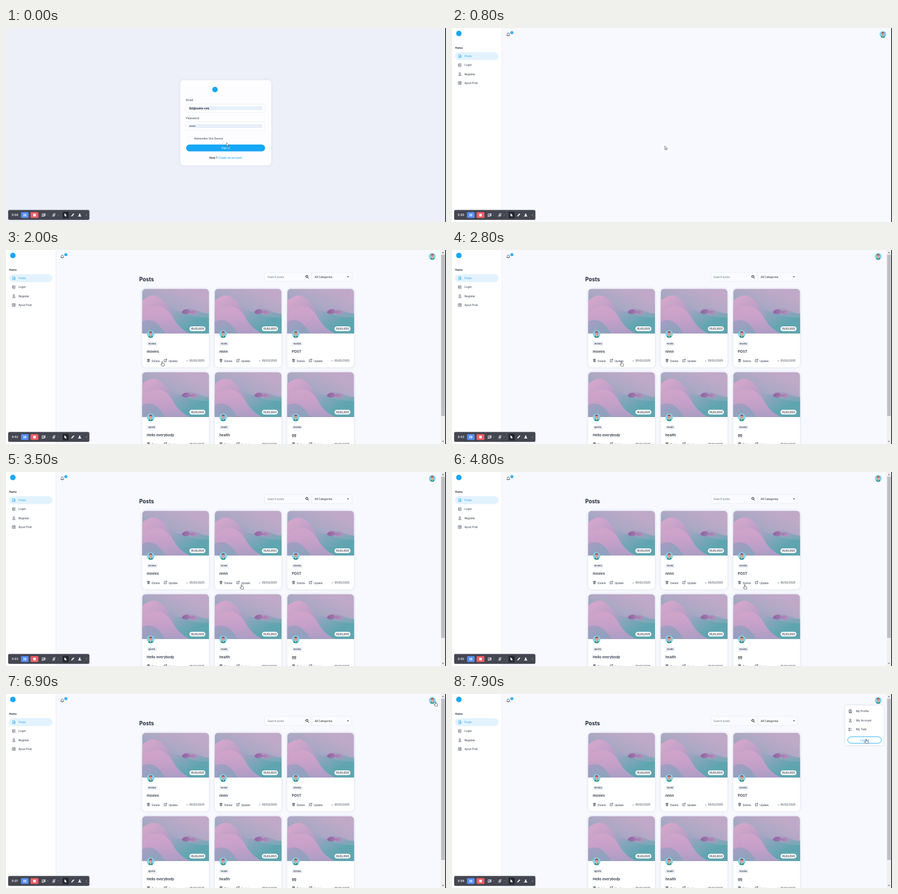
Write an HTML page with a canvas that moves like this. It is 800 by 353 pixels and loops after 8000 ms.

```html
<!DOCTYPE html>
<html lang="en">
<head>
<meta charset="utf-8">
<title>Posts dashboard</title>
<style>
html, body { margin: 0; width: 100%; height: 100%; overflow: hidden; background: #f8f9ff; }
canvas { display: block; width: 800px; height: 353px; }
</style>
</head>
<body>
<canvas id="stage"></canvas>
<script>
const LOOP = 8000, W = 800, H = 353;
const BLUE = '#18a7f4', INK = '#2a3547', DARK = '#1c2536';
const canvas = document.getElementById('stage');
const ctx = canvas.getContext('2d');
const ratio = window.devicePixelRatio || 1;
canvas.width = W * ratio;
canvas.height = H * ratio;

const LOADED = 400, POSTS = 900, MENU_OPEN = 7150;
const SECONDS = [1000, 1900, 2800, 3800, 4700, 5800, 6750, 7700];

// Pointer path: time, x, y
const PATH = [
  [0, 401, 209], [300, 400, 212], [800, 387, 215], [1100, 384, 214],
  [1900, 284, 203], [2300, 285, 203], [2700, 301, 203], [3400, 428, 205],
  [3800, 429, 205], [4600, 530, 205], [4900, 533, 205], [5400, 564, 196],
  [5600, 567, 200], [5800, 568, 200], [6600, 771, 23], [6850, 781, 14],
  [7050, 781, 14], [7500, 757, 64], [7850, 753, 82], [8000, 753, 82]
];

function text(str, x, y, size, color = INK, weight = 400, align = 'left') {
  ctx.font = `${weight} ${size}px Inter, sans-serif`;
  ctx.textAlign = align;
  ctx.fillStyle = color;
  ctx.fillText(str, x, y);
}

function box(x, y, w, h, r, fill, stroke, line = 0.6) {
  ctx.beginPath();
  ctx.roundRect(x, y, w, h, r);
  if (fill) { ctx.fillStyle = fill; ctx.fill(); }
  if (stroke) { ctx.strokeStyle = stroke; ctx.lineWidth = line; ctx.stroke(); }
}

function raised(x, y, w, h, r, blur, fill = '#fff') {
  ctx.save();
  ctx.shadowColor = 'rgba(90,110,150,.22)';
  ctx.shadowBlur = blur * ratio;
  box(x, y, w, h, r, fill);
  ctx.restore();
}

function dot(x, y, r, fill) {
  ctx.beginPath();
  ctx.arc(x, y, r, 0, Math.PI * 2);
  ctx.fillStyle = fill;
  ctx.fill();
}

function shape(d, x, y, fill, stroke, line = 0.7) {
  const p = new Path2D(d);
  ctx.save();
  ctx.translate(x, y);
  ctx.lineJoin = ctx.lineCap = 'round';
  if (fill) { ctx.fillStyle = fill; ctx.fill(p); }
  if (stroke) { ctx.strokeStyle = stroke; ctx.lineWidth = line; ctx.stroke(p); }
  ctx.restore();
}

function gradient(x0, y0, x1, y1, ...colors) {
  const g = ctx.createLinearGradient(x0, y0, x1, y1);
  colors.forEach((c, i) => g.addColorStop(i / (colors.length - 1), c));
  return g;
}

// Icons are centred on 0,0
const ICON = {
  page: 'M-2-2.7H1L2.3-1.2V2.7H-2ZM.7-2.6V-1H2.2M-1 .3H1.2M-1 1.5H1.2',
  login: 'M-2-2.6H2V2.6H-2ZM-3 0H.5M-.5-1L.6 0L-.5 1',
  user: 'M-1.4-1.3A1.4 1.4 0 1 0 1.4-1.3A1.4 1.4 0 1 0-1.4-1.3M-2.2 2.7Q-2 .8 0 .8Q2 .8 2.2 2.7Z',
  add: 'M-2.6-1.8H2.6V2.6H-2.6ZM-1.4-2.8V-1M1.4-2.8V-1M-1 .7H1M0-.3V1.7',
  trash: 'M-2.3-1.7H2.3M-1-1.7V-2.6H1V-1.7M-1.8-1.5L-1.5 2.6H1.5L1.8-1.5M-.5-.4V1.5M.5-.4V1.5',
  edit: 'M0-1.8H-2.3V2.4H1.9V.2M-.8 .8L2.4-2.4M.9-2.5H2.5V-.9',
  bell: 'M-2.6 1.6Q-1.8 .8-1.8-.8A1.8 2 0 0 1 1.8-.8Q1.8 .8 2.6 1.6ZM-.8 2.6Q0 3.3 .8 2.6',
  list: 'M-2.5-2.5H-.8V-.8H-2.5ZM-2.5 .8H-.8V2.5H-2.5ZM.7-1.6H2.6M.7 1.6H2.6'
};
const icon = (name, x, y, color = INK, line = 0.6) => shape(ICON[name], x, y, null, color, line);

function avatar(x, y, r) {
  ctx.save();
  ctx.translate(x, y);
  ctx.scale(r / 7, r / 7);
  dot(0, 0, 7, '#7fd3e8');
  ctx.clip();
  shape('M-5 8Q-4.5 2.7 0 2.7Q4.5 2.7 5 8Z', 0, 0, '#278f87');
  shape('M-1.4 2.4H1.4L0 6Z', 0, 0, '#f5e9e4');
  box(-2.4, -3.4, 4.8, 6.4, 2.3, '#e79a86');
  shape('M-3-1Q-3.4-5 0-5Q3.4-5 3-1L2.1-2.4H-2.1Z', 0, 0, '#a4475a');
  ctx.restore();
}

function picture(x, y, w, h) {
  ctx.save();
  ctx.beginPath();
  ctx.roundRect(x, y, w, h, [7, 7, 0, 0]);
  ctx.clip();
  ctx.translate(x, y);
  ctx.fillStyle = gradient(75, 0, 45, 65, '#c0a9c8', '#aaa8c4', '#74a4b8');
  ctx.fillRect(0, 0, w, h);
  shape('M70 40C88 27 104 46 122 45V82H40Z', 0, 0, gradient(85, 34, 100, 80, '#b29cbf', '#79a8b7', '#66a7b2'));
  shape('M0 21C12 12 23 9 32 16C47 25 45 36 61 40C79 43 86 53 122 53V82H0Z', 0, 0,
    gradient(22, 12, 70, 82, '#d2a6cb', '#bd9fc7', '#85a5bb', '#5fa5b0'));
  shape('M0 44C15 31 30 28 43 37C59 48 56 67 88 82H0Z', 0, 0,
    gradient(30, 32, 34, 82, '#d2a4ca', '#c5a0c8', '#ad9dc4'));
  shape('M0 60C17 52 29 60 42 82H0Z', 0, 0, gradient(0, 56, 15, 82, '#a89cc2', '#8fa2be'));
  shape('M72 43C76 36 86 36 88 42C84 48 76 47 72 43ZM87 43C91 37 99 39 100 44C96 47 91 47 87 43Z',
    0, 0, gradient(72, 38, 96, 47, '#885f9f', '#b58abc'));
  ctx.restore();
}

function card(x, y, tag, title) {
  raised(x, y, 121.5, 143, 7, 4);
  picture(x, y, 121.5, 81.5);
  box(x + 86, y + 68.5, 29, 8.6, 4.3, '#fff');
  text('05/02/2025', x + 100.7, y + 74.4, 4.15, INK, 600, 'center');
  avatar(x + 15.5, y + 82.3, 6.9);
  ctx.font = '500 4.1px Inter, sans-serif';
  box(x + 8.5, y + 96.3, ctx.measureText(tag).width + 5.5, 8, 2, '#eef1f7');
  text(tag, x + 11.2, y + 101.9, 4.1, INK, 500);
  text(title, x + 8.5, y + 116.6, 6.3, INK, 600);
  icon('trash', x + 11.5, y + 130.6);
  text('Delete', x + 17.5, y + 133.5, 4.9);
  icon('edit', x + 42.3, y + 130.6);
  text('Update', x + 48, y + 133.5, 4.85);
  dot(x + 81.8, y + 131.2, 1, '#98a3b5');
  text('05/02/2025', x + 86, y + 132.8, 4.85);
}

function loginPage() {
  ctx.fillStyle = '#edf0f8';
  ctx.fillRect(0, 0, W, H);
  raised(316.5, 94.5, 166, 155.5, 7, 3, '#fdfdff');
  dot(380, 112, 5, BLUE);
  text('Email', 327.3, 133.2, 5.1);
  text('Password', 327.3, 165.5, 5.1);
  for (const y of [138.5, 171]) {
    box(327.5, y, 143.5, 15, 2, '#fff', '#e1e6f0');
    box(332, y + 4, 134, 7, 0, '#e7effb');
  }
  text('Qel@zumiv.com', 333, 147.8, 4.6, '#111', 600);
  for (let i = 0; i < 6; i++) dot(334 + i * 1.9, 178.6, 0.75, '#222');
  box(331.5, 197.8, 6.8, 6.8, 1.3, '#fff', '#dfe5ef');
  text('Remember this Device', 342.3, 202.9, 4.95);
  box(327.5, 212, 143.5, 12.6, 6.3, BLUE);
  text('Sign in', 399.3, 220.1, 4.9, '#fff', 400, 'center');
  text('New ?', 370, 237.7, 4.9, INK, 600);
  text('Create an account', 386, 237.7, 4.9, BLUE, 500);
}

function shell(avatarX) {
  ctx.fillStyle = '#f8f9ff';
  ctx.fillRect(0, 0, W, H);
  ctx.fillStyle = '#fff';
  ctx.fillRect(0, 0, 90.5, H);
  ctx.fillStyle = '#e8ebf2';
  ctx.fillRect(90.5, 0, 0.9, H);
  dot(12.5, 10, 5, BLUE);
  text('Home', 5.5, 38.2, 4.9, DARK, 600);
  box(5.5, 44, 79, 14.6, 7.3, '#e3f3fe');
  const items = [['page', 'Posts'], ['login', 'Login'], ['user', 'Register'], ['add', 'Ajout Post']];
  items.forEach(([name, label], i) => {
    const y = 51.3 + i * 16.2, color = i ? INK : BLUE;
    icon(name, 14.3, y, color);
    text(label, 22.7, y + 1.8, 5.05, color);
  });
  icon('bell', 102.3, 11.7, INK, 0.7);
  dot(108.9, 8.4, 2.7, BLUE);
  text('0', 108.9, 9.5, 3, '#fff', 400, 'center');
  avatar(avatarX, 11.6, 6.1);
}

function postsPage() {
  shell(775);
  text('Posts', 242.3, 56.6, 9.8, DARK, 700);
  box(470.5, 40.7, 85.5, 16.4, 2, '#fafbff', '#e1e5ee');
  box(556, 40.7, 73, 16.4, 2, '#fafbff', '#e1e5ee');
  text('Search posts', 475.6, 50.8, 4.8, '#667080');
  shape('M-2.4-.7A2 2 0 1 0 1.6-.7A2 2 0 1 0-2.4-.7M1 1L2.9 2.9', 547.4, 48.8, null, '#222', 1);
  text('All Categories', 561.3, 50.8, 4.85, '#222');
  shape('M-1.8-.9H1.8L0 .9Z', 621.8, 49, '#444');
  const posts = [['movies', 'movies'], ['movie', 'nnnn'], ['movies', 'POST'],
    ['sports', 'Hello everybody'], ['health', 'health'], ['movies', 'gg']];
  posts.forEach(([tag, title], i) =>
    card(247.5 + (i % 3) * 131.9, 70.5 + Math.floor(i / 3) * 151.7, tag, title));
  ctx.fillStyle = '#f0f0f2';
  ctx.fillRect(790.3, 0, 8.4, H);
  ctx.fillStyle = '#bfc0c3';
  ctx.fillRect(791.2, 8.5, 6.7, 293.5);
  shape('M-1.8 1H1.8L0-1.1Z', 794.5, 4.4, '#666');
  shape('M-1.8-1H1.8L0 1.1Z', 794.5, 348.4, '#666');
}

function menu() {
  raised(715, 21, 69.5, 72, 3, 4);
  const items = [['user', 'My Profile'], ['user', 'My Account'], ['list', 'My Task']];
  items.forEach(([name, label], i) => {
    const y = 31.2 + i * 16.7;
    if (!i) box(721.2, y - 3, 6, 6, 3, null, INK, 0.5);
    icon(name, 724.2, y);
    text(label, 734.5, y + 1.8, 4.95);
  });
  box(719.5, 77.8, 61, 11.8, 5.9, '#fff', BLUE, 0.9);
  text('Logout', 750, 85.5, 5, BLUE, 400, 'center');
}

function toolbar(t) {
  ctx.save();
  ctx.shadowColor = 'rgba(0,0,0,.3)';
  ctx.shadowBlur = 2 * ratio;
  box(4, 331.2, 147.5, 17.8, 2.5, '#444651');
  ctx.restore();
  const s = SECONDS.filter(at => t >= at).length;
  text(`0:0${s}`, 10.6, 341.9, 5.1, '#fff', 600);
  box(27.2, 335, 14, 10.7, 2, '#568df0');
  box(32, 338, 1.5, 4.7, 0.3, '#fff');
  box(35, 338, 1.5, 4.7, 0.3, '#fff');
  box(44.5, 335, 14.5, 10.7, 2, '#ee5d64');
  box(49.5, 338.1, 4.6, 4.6, 0.5, '#fff');
  const pale = '#f1f1f4';
  shape('M-2.2-2.2H1.5V2.2H-2.2ZM1.5-.7L2.9-1.7V1.7L1.5 .7M-2.8 3.1L2.9-3.1', 68.3, 340.3, null, pale, 0.9);
  shape('M-1-1.8A1 1 0 0 1 1-1.8V0A1 1 0 0 1-1 0ZM-2.2 0Q-2 2 0 2Q2 2 2.2 0M0 2V3.2M-2.9 3.1L2.9-3.1', 87, 340.2, null, pale, 0.8);
  for (const x of [76, 95]) shape('M-.7-.4L0 .4L.7-.4', x, 340.4, null, '#b5b6bd', 0.6);
  ctx.fillStyle = '#5c5e69';
  ctx.fillRect(99.2, 333.5, 0.6, 13);
  box(103, 334.4, 11, 11.8, 1.5, '#25272f');
  shape('M-1.9-3L2.5 1.1H.6L1.6 3.2L.6 3.6L-.4 1.5L-1.9 2.7Z', 108.2, 340.1, '#fff');
  shape('M-2.8 2.9L-2.2 .7L1.5-2.9L2.8-1.5L-.8 2.2Z', 121.3, 340.2, pale);
  shape('M-2.8 2.8H2.8V1.6L1.2 .9V-2.5H-1.2V.9L-2.8 1.6Z', 134, 340.2, pale);
  shape('M.8-1.6L-.8 0L.8 1.6', 146, 340.2, null, '#a9abb3', 0.7);
}

function pointerAt(t) {
  const i = Math.max(1, PATH.findIndex(p => p[0] > t));
  const [t0, x0, y0] = PATH[i - 1], [t1, x1, y1] = PATH[i];
  const k = (t - t0) / (t1 - t0), e = k * k * (3 - 2 * k);
  return [x0 + (x1 - x0) * e, y0 + (y1 - y0) * e];
}

function isLink(t, x, y) {
  if (t < LOADED) return y > 212;
  if (t < POSTS) return false;
  if (t >= MENU_OPEN && x > 719 && y > 23) return true;
  if (Math.hypot(x - 775, y - 11.6) < 8) return true;
  return x > 250 && x < 580 && y > 195 && y < 210 && (x - 250) % 131.9 < 65;
}

function pointer(t) {
  const [x, y] = pointerAt(t);
  if (isLink(t, x, y)) {
    shape('M-.8 .7A.8 .8 0 0 1 .8 .7V3.2L3.2 3.8Q4 4.1 3.8 5L3.3 8.2H-.8L-2.8 5.2Q-2.4 4.1-.8 5.2Z', x, y, '#fff', '#333', 0.65);
  } else {
    shape('M0 0V6.1L1.4 4.9L2.4 7.2L3.5 6.7L2.5 4.5H4.3Z', x, y, '#fff', '#333', 0.6);
  }
}

function draw(now) {
  const t = now % LOOP;
  ctx.setTransform(ratio, 0, 0, ratio, 0, 0);
  if (t < LOADED) loginPage();
  else if (t < POSTS) shell(783.5);
  else postsPage();
  if (t >= MENU_OPEN) menu();
  toolbar(t);
  pointer(t);
  ctx.fillStyle = '#08080a';
  ctx.fillRect(798.7, 0, 1.3, H);
}

const start = performance.now();
function frame() {
  draw(performance.now() - start);
  requestAnimationFrame(frame);
}
frame();
</script>
</body>
</html>
```
